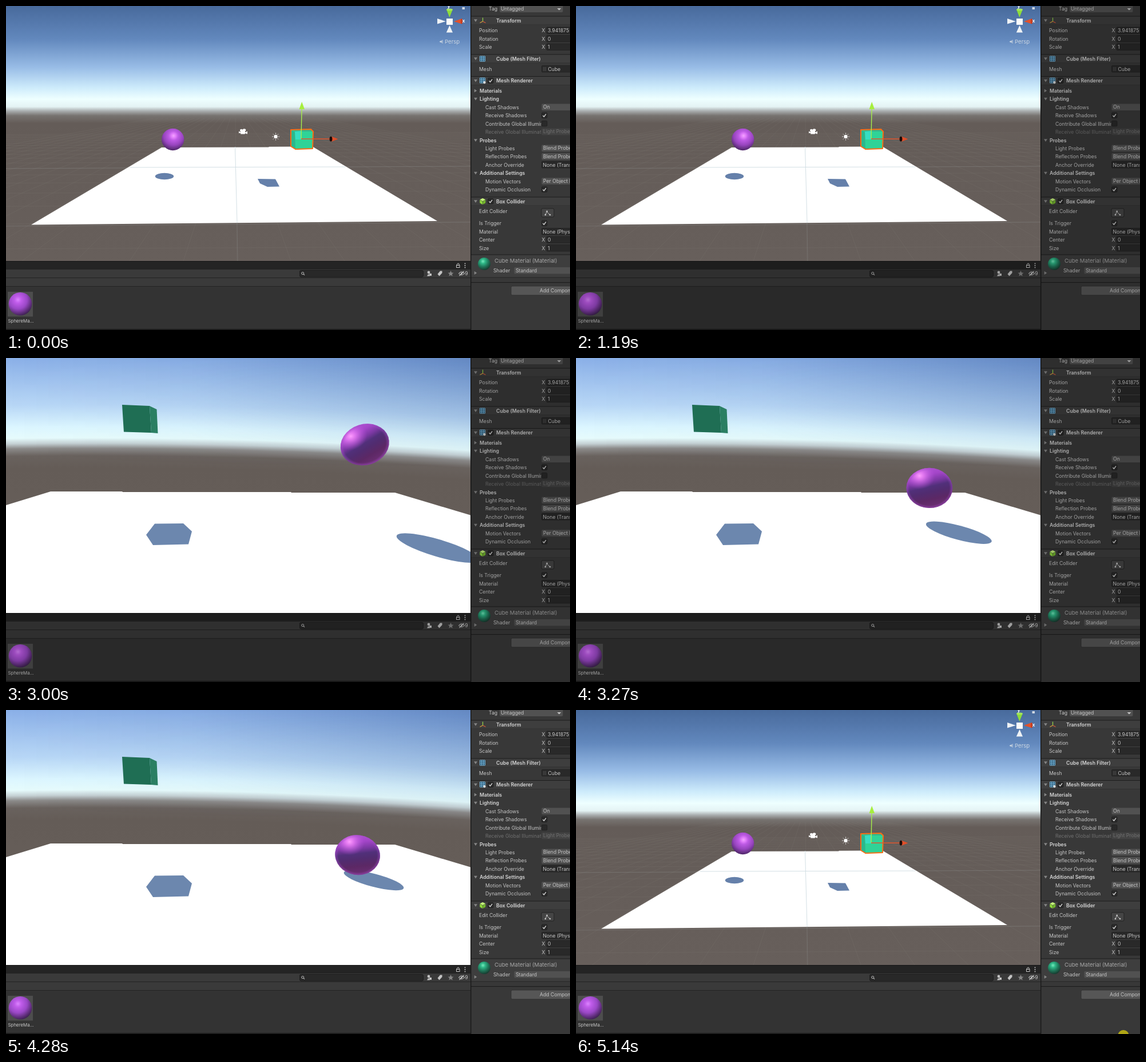
An HTML page that plays this animation: 986 by 568 pixels, repeating every 5.21 s.

```html
<!DOCTYPE html>
<html lang="en">
<head>
<meta charset="utf-8">
<title>Falling sphere in an editor</title>
<style>
html, body { margin: 0; width: 100%; height: 100%; overflow: hidden; background: #333; }
svg { display: block; width: 100%; height: 100%; }
text { font: 8.7px Inter, "Liberation Sans", sans-serif; fill: #c6c6c6; white-space: pre; }
.b { font-weight: 600; fill: #d6d6d6; }
.off { fill: #707070; }
</style>
</head>
<body>
<svg id="stage" viewBox="0 0 986 568" preserveAspectRatio="none"></svg>
<script>
const LOOP = 5210, SCENE_W = 812, SCENE_H = 447;
const stage = document.getElementById('stage');

// Markup helpers
const rect = (x, y, w, h, fill, more = '') =>
  `<rect x="${x}" y="${y}" width="${w}" height="${h}" fill="${fill}" ${more}/>`;
const poly = (pts, fill, more = '') => `<polygon points="${pts}" fill="${fill}" ${more}/>`;
const line = (d, color, w = 1, more = '') =>
  `<path d="${d}" fill="none" stroke="${color}" stroke-width="${w}" ${more}/>`;
const oval = (x, y, rx, ry, fill, more = '') =>
  `<ellipse cx="${x}" cy="${y}" rx="${rx}" ry="${ry}" fill="${fill}" ${more}/>`;
const text = (x, y, s, cls = '', more = '') =>
  `<text x="${x}" y="${y + 3.2}" class="${cls}" ${more}>${s}</text>`;
const stops = list => list.map(([o, c, a = 1]) =>
  `<stop offset="${o}" stop-color="${c}" stop-opacity="${a}"/>`).join('');
const linear = (id, attrs, list) =>
  `<linearGradient id="${id}" ${attrs}>${stops(list)}</linearGradient>`;
const radial = (id, attrs, list) =>
  `<radialGradient id="${id}" ${attrs}>${stops(list)}</radialGradient>`;

const R = 9960; // radius of the curved horizon
const defs = `<defs>
${linear('sky', 'x1="0" y1="0" x2="0" y2="1"', [[0, '#486a9c'], [.13, '#6288bd'], [.24, '#98bce6'],
  [.32, '#cdebfb'], [.365, '#eeffff'], [.395, '#e4f3f4'], [.412, '#a9adae'], [.43, '#777370'],
  [.46, '#645c58'], [1, '#675f5b']])}
${radial('dome', `gradientUnits="userSpaceOnUse" cx="150" cy="${152 + R}" fr="${R - 300}" r="${R + 180}"`,
  [[0, '#69615c'], [.54, '#645c57'], [.585, '#69625e'], [.612, '#8b8a89'], [.63, '#c4d0d3'], [.65, '#e6fbfc'],
  [.69, '#dcf6ff'], [.77, '#b8d7f6'], [.96, '#86ace6'], [1, '#7ea4df']])}
${linear('side', '', [[0, '#2d4f85', 0], [.4, '#2d4f85', .06], [1, '#2d4f85', .34]])}
${linear('fade', 'x1="0" y1="0" x2="0" y2="1"', [[0, '#fff'], [1, '#000']])}
${radial('orb', 'cx=".53" cy=".33" r=".7"', [[0, '#f3a5ff'], [.14, '#e27dfb'], [.3, '#bd5ae4'],
  [.62, '#9644bd'], [.85, '#633080'], [1, '#4a2463']])}
${radial('thumb', 'cx=".4" cy=".32" r=".72"', [[0, '#dc84ff'], [.2, '#c05cea'], [.55, '#9a48c6'],
  [.85, '#582b72'], [1, '#38204a']])}
${radial('green', 'cx=".4" cy=".3" r=".72"', [[0, '#78eabd'], [.25, '#2fb888'], [.6, '#20775a'], [1, '#17382d']])}
${linear('body', 'x1=".32" y1="0" x2=".62" y2="1"', [[0, '#b653da'], [.2, '#a345c8'], [.36, '#7b38a2'],
  [.48, '#51307a'], [.6, '#512c70'], [.78, '#5c2865'], [1, '#6d2f74']])}
${radial('glow', 'cx=".28" cy=".2" r=".34"', [[0, '#ff9dff'], [.3, '#ee80f8', .75], [1, '#b653da', 0]])}
${radial('rim', '', [[0, '#a34cc6', 0], [.86, '#a34cc6', 0], [1, '#a34cc6', .55]])}
<mask id="top">${rect(0, 0, SCENE_W, 190, 'url(#fade)')}</mask>
<clipPath id="view">${rect(0, 0, SCENE_W, SCENE_H, '#fff')}</clipPath>
</defs>`;

// Ground grid: depth is proportional to 1 / (y - vanishing line)
function grid() {
  const vx = 401, vy = 170;
  let d = '';
  for (let k = -16; k <= 16; k++) {
    d += `M${vx + k * 9} ${vy + 27}L${vx + 3 + k * 94} ${SCENE_H}`;
  }
  for (let k = -1; k < 18; k++) {
    const y = vy + 1 / (.00476 + k * .00082);
    d += `M0 ${y + 2}L${SCENE_W} ${y - 2}`;
  }
  return line(d, '#a09994', .8, 'opacity=".13"') +
    line(`M0 386L${SCENE_W} 379M0 285L${SCENE_W} 281M404 380L405 447`, '#8d9290', .8, 'opacity=".4"');
}

function sceneView() {
  const cube = '498,217 533,216 537,220 536,250 506,251 498,246';
  const rays = [...Array(8)].map((_, i) => {
    const a = i * Math.PI / 4, c = Math.cos(a), s = Math.sin(a);
    return `M${471.5 + c * 4.6} ${229 + s * 4.6}L${471.5 + c * 6.5} ${229 + s * 6.5}`;
  }).join('');
  return rect(0, 0, SCENE_W, SCENE_H, 'url(#sky)') + grid() +
    poly('44,383.5 272,248 459,247.5 460,246.8 536,246.5 754,377', '#fff') +
    line('M217 283L593 282M400.5 247L404 380', '#d3dfe4') +
    oval(277, 298.5, 16.2, 5.8, '#6580aa') +
    poly('440,303 471,303.5 478,316.5 457,317 444,311', '#6580aa') +
    oval(291.7, 234, 19.7, 19.2, 'url(#orb)') +
    // Camera and sun icons
    oval(411.5, 218, 2.5, 2.2, '#fff') + oval(416.5, 217.6, 2.8, 2.4, '#fff') +
    rect(410, 219, 8, 5.5, '#fff', 'rx="1"') + poly('418,221.5 422,219.5 422,224.5 418,223', '#fff') +
    poly('410,221 407,219.5 407,223 410,222.5', '#fff') +
    oval(471.5, 229, 3.2, 3.2, '#fff') + line(rays, '#e8e8e8', 1) +
    // Selected cube with its move handles
    poly(cube, '#2fd397') + poly('498,217 505,221 506,251 498,246', '#2cb78c') +
    poly('498,217 533,216 537,220 505,220', '#35b58c') +
    poly('505,220 516,219 516,234 506,234', '#36ddc2') +
    poly(cube, 'none', 'stroke="#ff6b12" stroke-width="1.9" stroke-linejoin="round"') +
    line('M516 233L517 181', '#a5ee4a', 1.4) + poly('517.2,168 522,181 512.5,181', '#a6ee3e') +
    line('M516 233H567', '#e2552c', 1.3) + poly('580.5,233.2 569,228.8 569,237.8', '#e2502a') +
    oval(568, 233.2, 2.4, 4.4, '#1b0d0a') +
    // Orientation widget
    poly('775.3,20 770,6 781,6', '#8edc3c') + oval(775.5, 6.4, 5.4, 1.8, '#a4e85c') +
    poly('769,27 754,22 754,31.5', '#eef2f5') + poly('775.5,34 769.8,46.5 781,46.5', '#eef2f5') +
    poly('783,27 797,22 797,31.5', '#e2512b') + oval(796.5, 26.8, 1.6, 4.8, '#c63f20') +
    rect(770, 22, 11, 11, '#fafafa') +
    text(797.6, 26, 'x', 'b', 'style="fill:#fff"') + text(771.5, 0, 'y', 'b', 'style="fill:#fff"') +
    rect(797.5, 2, 4.5, 4, '#cfd8e2') +
    line('M764 60L758 62.5L764 65M758 62.5H764', '#cbd6e2', 1) +
    text(767, 62.5, 'Persp', '', 'style="font-size:9.6px;fill:#cbd6e2"');
}

function gameView() {
  return rect(0, 0, SCENE_W, SCENE_H, 'url(#dome)') +
    rect(0, 0, SCENE_W, 190, 'url(#side)', 'mask="url(#top)"') +
    poly('0,258 78,234 203,234 204,235 498,235 499,236 680,236 812,275.5 812,447 0,447', '#fff') +
    poly('260,290.5 310,290 325,304 319,326.5 257,328 245,310', '#6c87ae') +
    poly('203,82 251,84 254,131 206,129.5', '#1f6e54') +
    poly('251,84 263.5,90 265.5,132 254,131', '#2b7f63') +
    `<ellipse id="shade" fill="#6c87ae"/>
     <g id="ball">${['body', 'glow', 'rim'].map(g => `<circle r="1" fill="url(#${g})"/>`).join('')}</g>`;
}

function projectPanel() {
  const sub = 'style="font-size:7.9px"';
  return rect(0, 447, 813, 121, '#333') + rect(0, 447, 813, 15, '#242424') + rect(0, 447, 813, 1, '#161616') +
    rect(0, 462, 813, 15, '#3a3a3a') + rect(0, 476.5, 813, 15, '#3a3a3a') +
    rect(0, 476, 813, 1, '#232323') + rect(0, 491, 813, 1, '#242424') + rect(0, 566, 813, 2, '#1e1e1e') +
    rect(513.5, 463.5, 216, 11.5, '#282828', 'rx="2.5" stroke="#1c1c1c"') +
    line('M520.4 470.2L522 472', '#c4c4c4', 1.1) +
    `<circle cx="518.7" cy="468.6" r="2" fill="none" stroke="#c4c4c4"/>` +
    rect(787.5, 454.5, 5.5, 4, 'none', 'stroke="#c4c4c4"') + line('M788.5 454V452.5Q790 450 792 452V454', '#c4c4c4') +
    [451.5, 455, 458.5].map(y => oval(802.5, y, 1, 1, '#c4c4c4')).join('') +
    oval(739, 467, 2.4, 2.4, '#c4c4c4') + rect(740, 469, 4, 4, '#c4c4c4') + poly('736,473.5 738.5,469.5 741,473.5', '#c4c4c4') +
    poly('754.5,470 759,464.5 762.5,464.5 762.5,468 757.5,473.5', '#c4c4c4') +
    poly('777.5,464 779,467.5 782.5,467.8 779.8,470 780.6,473.6 777.5,471.7 774.4,473.6 775.2,470 772.5,467.8 776,467.5', '#858585') +
    line('M791.5 469Q796.5 463 801.5 469Q796.5 474.5 791.5 469M792.5 473L800.5 465', '#c4c4c4', 1.1) +
    oval(796.5, 469, 1.6, 1.6, '#c4c4c4') + text(802.3, 469, '9') +
    rect(3, 501, 44, 43.5, '#4d4d4d') + oval(25, 522.3, 20.3, 20.3, 'url(#thumb)') +
    text(3.5, 551.5, 'SphereMa...', '', sub);
}

// Inspector parts
const fold = (x, y, open = true) => open
  ? poly(`${x},${y - 2.3} ${x + 6},${y - 2.3} ${x + 3},${y + 2.5}`, '#858585')
  : poly(`${x + .7},${y - 3} ${x + 5.3},${y} ${x + .7},${y + 3}`, '#858585');
const check = (x, y, on = true) => rect(x, y - 5, 9.5, 9.5, '#292929', 'rx="1.5" stroke="#1e1e1e" stroke-width=".7"') +
  (on ? line(`M${x + 2} ${y}L${x + 4} ${y + 2.2}L${x + 7.6} ${y - 2.6}`, '#dcdcdc', 1.3) : '');
const drop = (y, s, cls) => rect(936.5, y - 6, 60, 11.5, cls ? '#434343' : '#515151', 'rx="1.5"') + text(939, y - .5, s, cls);
const field = (x, y, s) => rect(x, y - 6, 60, 11.5, '#292929', 'rx="1.5" stroke="#1f1f1f" stroke-width=".7"') + text(x + 2, y, s);
const axis = (y, label, value) => text(827, y, label) + text(936.5, y, 'X') + field(945, y, value);
const header = (y, title, x = 857) => rect(813, y - 7.5, 173, 14.5, '#3e3e3e') +
  rect(813, y - 8, 173, 1, '#1d1d1d') + rect(813, y + 7, 173, .6, '#303030') +
  fold(818, y) + text(x, y, title, 'b');
const meshIcon = y => rect(828.5, y - 4.5, 9, 9, '#23465c') +
  line([0, 3, 6, 9].map(k => `M${828.5 + k} ${y - 4.5}v9M828.5 ${y - 4.5 + k}h9`).join(''), '#7fc4ee', .9);

function inspector() {
  const row = (y, s, cls) => text(838, y, s, cls);
  return rect(812, 0, 174, 568, '#383838') +
    text(844, 5, 'Tag') + rect(863, -2, 110.5, 13, '#515151', 'rx="2"') + text(865, 5, 'Untagged') +
    poly('963.5,4 970.5,4 967,7.5', '#c4c4c4') +
    header(25.5, 'Transform') +
    line('M833.5 27V20.5', '#8fd14a', 1.3) + line('M833.5 27L828.5 29.5', '#d9a441', 1.3) + line('M833.5 27L838.5 29.5', '#d8593a', 1.3) +
    axis(43, 'Position', '3.941875') + axis(57.5, 'Rotation', '0') + axis(72, 'Scale', '1') +
    header(92.5, 'Cube (Mesh Filter)') + meshIcon(92.5) +
    text(827, 110.5, 'Mesh') + field(936.5, 110.5, '') + text(947.5, 110.5, 'Cube') +
    line('M939 108h6M939 110.5h6M939 113h6', '#777', 1, 'stroke-dasharray="1 1"') +
    header(131, 'Mesh Renderer') + meshIcon(130.5) + oval(836.5, 134, 2.2, 2.2, '#d9d9d9') + check(842.5, 131) +
    fold(818, 148.5, false) + text(828, 148.5, 'Materials', 'b') +
    [[163, 'Lighting'], [235.5, 'Probes'], [293, 'Additional Settings']]
      .map(([y, s]) => fold(818, y) + text(828, y, s, 'b')).join('') +
    row(177.5, 'Cast Shadows') + row(192, 'Receive Shadows') +
    row(206.3, 'Contribute Global Illumination') + row(220.7, 'Receive Global Illumination', 'off') +
    rect(935.5, 199, 51, 28, '#383838') +
    drop(177.5, 'On') + check(936.5, 192) + check(936.5, 206.3, false) + drop(220.7, 'Light Probes', 'off') +
    row(249.5, 'Light Probes') + drop(249.5, 'Blend Probes') +
    row(264, 'Reflection Probes') + drop(264, 'Blend Probes') +
    row(278.5, 'Anchor Override') + field(936.5, 278.5, 'None (Transform)') +
    row(307.3, 'Motion Vectors') + drop(307.3, 'Per Object Motion') +
    row(321.8, 'Dynamic Occlusion') + check(936.5, 321.8) +
    header(342.5, 'Box Collider') + check(842.5, 342.5) +
    poly('833.3,337 838.3,339.5 833.3,342.3 828.3,339.5', '#c4f27a') +
    poly('828.3,340 833,342.8 833,348 828.3,345.2', '#8fd63c') + poly('838.3,340 833.6,342.8 833.6,348 838.3,345.2', '#74b92c') +
    text(827, 360, 'Edit Collider') + rect(936, 355, 22, 15, '#454545', 'rx="2" stroke="#222"') +
    line('M943 366L945.5 360.5L948 363.5L951 366', '#c8c8c8', .9) +
    [[943, 366], [945.7, 360], [951, 366]].map(([x, y]) => rect(x - 1.2, y - 1.2, 2.4, 2.4, '#c8c8c8')).join('') +
    text(827, 381, 'Is Trigger') + check(936.5, 381) +
    text(827, 395.5, 'Material') + field(936.5, 395.5, 'None (Physic Material)') +
    axis(410, 'Center', '0') + axis(424.5, 'Size', '1') +
    rect(813, 436, 173, 40, '#3e3e3e') + rect(813, 435.5, 173, 1, '#1d1d1d') + rect(813, 475.5, 173, 1, '#242424') +
    oval(836, 452, 11, 11, 'url(#green)') + fold(818, 468, false) +
    text(854, 446.5, 'Cube Material (Material)', '', 'style="font-size:9.6px;fill:#a9a9a9"') +
    text(852, 464, 'Shader') + rect(888.5, 458, 100, 11.5, '#515151', 'rx="1.5"') + text(891, 463.5, 'Standard') +
    rect(813, 484, 173, 1.2, '#1d1d1d') +
    rect(883, 491, 110, 16, '#565656', 'rx="2" stroke="#303030"') + text(933, 498.5, 'Add Component') +
    rect(812, 0, 1.4, 568, '#191919');
}

stage.innerHTML = defs +
  `<g clip-path="url(#view)"><g id="scene">${sceneView()}</g><g id="game">${gameView()}</g></g>` +
  projectPanel() + inspector() +
  `<path id="dim" d="M0 447H812V0H986V568H0Z" opacity=".19"/>
   <circle id="dot" r="9.5" fill="#ffee00" opacity=".6"/>`;

const [scene, game, dim, dot, ball, shade] =
  ['scene', 'game', 'dim', 'dot', 'ball', 'shade'].map(id => document.getElementById(id));
const show = (el, on) => el.setAttribute('display', on ? 'inline' : 'none');
const mix = (a, b, p) => a + (b - a) * p;
const TICK = 66.7;

// Pointer legs: start time, x, y, end time, x, y
const legs = [
  [120, 927, 562, 590, 505, 155],
  [590, 505, 155, 660, 401, 20],
  [4480, 470, 90, 4610, 873, 508],
  [4610, 873, 508, 4680, 924, 563],
  [5070, 957, 570.5, LOOP, 957, 570.5]
];

function movePointer(t) {
  const leg = legs.findLast(l => t >= l[0] && t < l[3] + 60);
  show(dot, !!leg);
  if (!leg) return;
  const [t0, x0, y0, t1, x1, y1] = leg;
  const n = Math.round((t1 - t0) / TICK);
  const p = Math.min(1, Math.floor((t - t0) / (t1 - t0) * n + .01) / n);
  dot.setAttribute('cx', mix(x0, x1, p));
  dot.setAttribute('cy', mix(y0, y1, p));
}

// Free fall that stops on the floor
function dropBall(t) {
  const now = 2670 + Math.floor((t - 2666) / TICK) * TICK;
  const s = Math.min(1, Math.max(0, (now - 2745) / 590));
  const p = s * s, bend = p * (1 - p);
  const x = mix(630.3, 614.6, p), y = mix(127.5, 254.2, p);
  const turn = Math.atan2(y - 223, x - 406) * 180 / Math.PI;
  ball.setAttribute('transform',
    `translate(${x} ${y}) rotate(${turn}) scale(${mix(44, 39.4, p)} ${mix(36, 34.9, p)})`);
  shade.setAttribute('rx', mix(80, 54, p));
  shade.setAttribute('ry', mix(16, 11.5, p));
  shade.setAttribute('transform',
    `translate(${mix(785, 643, p) - 19 * bend} ${mix(343, 298.5, p) - 9 * bend}) rotate(${mix(17, 14.7, p)})`);
}

function draw(t) {
  const playing = t >= 2670 && t < 4410;
  show(scene, !playing);
  show(game, playing);
  show(dim, t >= 1190 && t < 4140);
  if (playing) dropBall(t);
  movePointer(t);
}

function frame() {
  draw(performance.now() % LOOP);
  requestAnimationFrame(frame);
}
frame();
</script>
</body>
</html>
```
